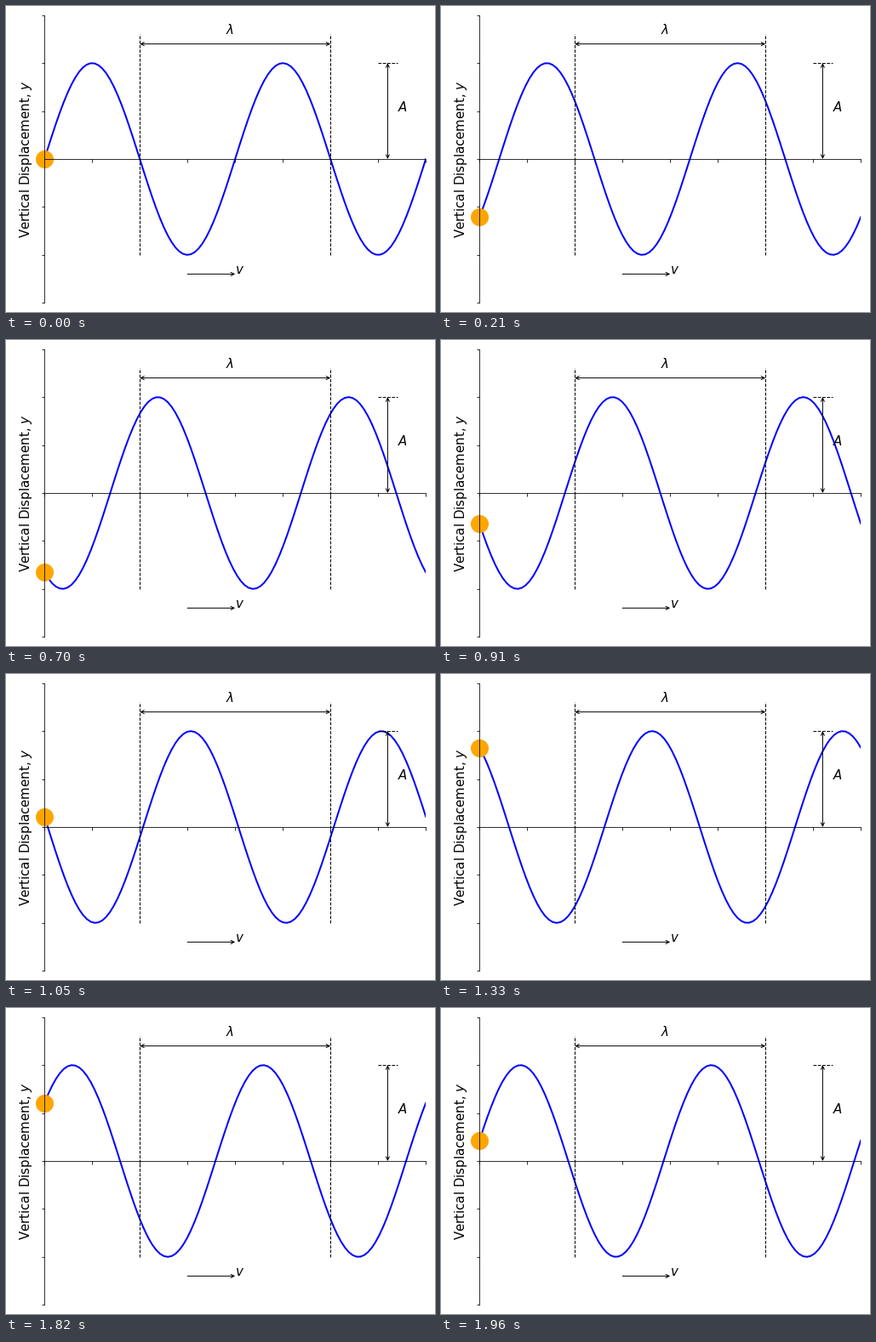
Animation, 504 px wide and 360 px high, one loop 2030 ms. Source, as a matplotlib script:

```python
import numpy as np
import matplotlib.pyplot as plt
from matplotlib.animation import FuncAnimation

W, H, DPI = 504, 360, 72
FRAMES, STEP = 29, 70
PAD, LEFT = 10.8, 45.2

plt.rcParams["font.family"] = "DejaVu Sans"
plt.rcParams["font.size"] = 10

fig = plt.figure(figsize=(W / DPI, H / DPI), dpi=DPI, facecolor="white")
ax = fig.add_axes([LEFT / W, PAD / H, (W - PAD - LEFT) / W, (H - 2 * PAD) / H])

# x in wavelengths, y in amplitudes
ax.set(xlim=(0, 2), ylim=(-1.5, 1.5),
       xticks=np.arange(0, 2.01, 0.25), yticks=np.arange(-1.5, 1.51, 0.5))
ax.tick_params(labelbottom=False, labelleft=False)
ax.spines["bottom"].set_position("center")
ax.spines[["top", "right"]].set_visible(False)
fig.text(28.5 / W, 0.5, "Vertical Displacement, $y$", size=15, rotation=90,
         rotation_mode="anchor", ha="center", va="baseline")


def dashed(xs, ys):
    ax.plot(xs, ys, "k--", lw=1)


def arrow(start, end, style="<->"):
    ax.annotate("", xy=end, xytext=start,
                arrowprops=dict(arrowstyle=style, shrinkA=0, shrinkB=0))


def label(x, y, text):
    ax.text(x, y, text, size=15)


x = np.linspace(0, 2, 100)
wave, = ax.plot([], [], "b", lw=2)
ball, = ax.plot([], [], "o", color="orange", ms=20, clip_on=False)

dashed([0.5, 0.5], [-1, 1.3])
dashed([1.5, 1.5], [-1, 1.3])
arrow((0.5, 1.2), (1.5, 1.2))
label(0.95, 1.3, r"$\lambda$")

dashed([1.75, 1.85], [1, 1])
arrow((1.8, 0), (1.8, 1))
label(1.85, 0.5, "$A$")

arrow((0.75, -1.2), (1, -1.2), "->")
label(1, -1.2, "$v$")


def update(i):
    y = np.sin(2 * np.pi * (x - i / FRAMES))
    wave.set_data(x, y)
    ball.set_data([0], [y[0]])
    return wave, ball


anim = FuncAnimation(fig, update, frames=FRAMES, interval=STEP,
                     repeat=True, repeat_delay=0, blit=False)
plt.show()
```
